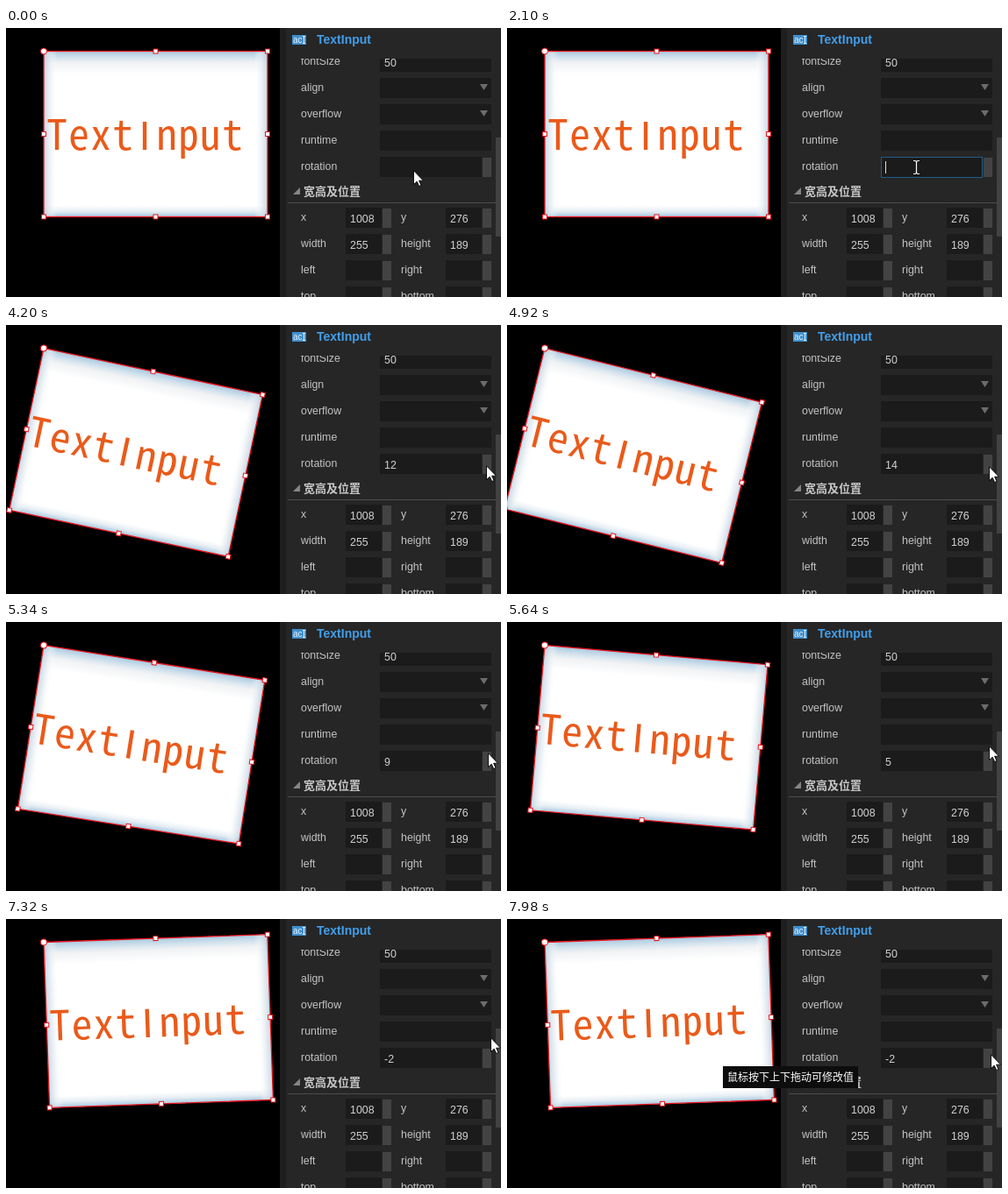
Recreate the animation shown at these times as an HTML page. Size 564 by 307 pixels, loop 8 s.

```html
<!DOCTYPE html>
<html lang="zh">
<head>
<meta charset="utf-8">
<title>Rotation field</title>
<style>
html, body { margin: 0; width: 100%; height: 100%; overflow: hidden; background: #000; }
svg { display: block; width: 564px; height: 307px; font: 12.4px "Liberation Sans", Arial, sans-serif; }
.label { fill: #c3c3c3; }
.value { fill: #d2d2d2; }
.cjk { font-family: "Noto Sans CJK SC", "Noto Sans CJK", sans-serif; }
.word { font: 47px "Noto Sans Mono CJK SC", "Noto Sans Mono", monospace; fill: #ea5a1a; text-anchor: middle; }
.bar { font-family: "Liberation Sans", sans-serif; }
.handle { fill: #fff; stroke: #e8141c; }
</style>
</head>
<body>
<svg viewBox="0 0 564 307">
  <defs>
    <clipPath id="canvasClip"><rect width="312" height="307"/></clipPath>
    <clipPath id="bodyClip"><rect x="312" y="35" width="252" height="272"/></clipPath>
    <linearGradient id="topShade" x2="0" y2="1">
      <stop offset="0" stop-color="#a9c9e0"/>
      <stop offset=".3" stop-color="#d6e4ee"/>
      <stop offset=".5" stop-color="#f0f2f4"/>
      <stop offset="1" stop-color="#fff"/>
    </linearGradient>
    <linearGradient id="bottomShade" x2="0" y2="1">
      <stop offset="0" stop-color="#fff"/>
      <stop offset=".5" stop-color="#e6eef4"/>
      <stop offset="1" stop-color="#a9c9e0"/>
    </linearGradient>
    <linearGradient id="sideShade">
      <stop offset="0" stop-color="#b9d0e0" stop-opacity=".8"/>
      <stop offset=".03" stop-color="#e4ebf0" stop-opacity=".6"/>
      <stop offset=".06" stop-color="#fff" stop-opacity="0"/>
      <stop offset=".94" stop-color="#fff" stop-opacity="0"/>
      <stop offset=".97" stop-color="#e4ebf0" stop-opacity=".6"/>
      <stop offset="1" stop-color="#b9d0e0" stop-opacity=".8"/>
    </linearGradient>
  </defs>

  <rect width="564" height="307"/>
  <g clip-path="url(#canvasClip)">
    <g id="box">
      <rect x="43" y="26.5" width="255" height="189" fill="#fff"/>
      <rect x="43" y="26.5" width="255" height="26" fill="url(#topShade)"/>
      <rect x="43" y="202.5" width="255" height="13" fill="url(#bottomShade)"/>
      <rect x="43" y="26.5" width="255" height="189" fill="url(#sideShade)"/>
      <text class="word" id="word"></text>
      <rect x="43" y="26.5" width="255" height="189" fill="none" stroke="#e8141c" stroke-width="1.3"/>
      <g id="handles"></g>
    </g>
  </g>

  <rect x="312" width="252" height="307" fill="#262626"/>
  <rect x="312" width="7" height="307" fill="#1e1e1e"/>
  <rect x="326" y="8" width="16" height="11" fill="#3f8fce"/>
  <text x="327" y="17" font-size="10" fill="#e8f1f8">ac</text>
  <path d="M339.5 9v9M338 9.5h3M338 17.5h3" stroke="#e8f1f8" fill="none"/>
  <text x="354" y="18" font-size="14" font-weight="bold" fill="#429fec">TextInput</text>

  <g id="rows" clip-path="url(#bodyClip)"></g>
  <path d="M335 182v8h-8z" fill="#858585"/>
  <text class="cjk" x="339" y="191" font-size="13" font-weight="bold" fill="#c8c8c8">宽高及位置</text>
  <path d="M321 199.5h237" stroke="#4c4c4c"/>
  <rect x="558" y="125" width="6" height="113" fill="#424242"/>

  <rect id="focus" x="426.5" y="147.5" width="115" height="23" fill="none" stroke="#1f5d8a"/>
  <text id="angle" class="value" x="431" y="164"></text>
  <rect id="caret" y="152" width="1" height="14" fill="#e0e0e0"/>

  <g id="tip">
    <rect width="154" height="25" fill="#0d0d0d"/>
    <text class="cjk" x="5" y="17" font-size="12" fill="#fff">鼠标按下上下拖动可修改值</text>
  </g>
  <path id="arrow" d="M.5 .8V16.6L4.2 13.2L6.7 18.5L9 17.5L6.6 12.2H11.5z" fill="#fff" stroke="#000" stroke-width=".9"/>
  <path id="beam" d="M-3 -7.5H-1L.5 -6.5L2 -7.5H4M.5 -7V7M-3 7.5H-1L.5 6.5L2 7.5H4" fill="none" stroke="#fff" stroke-width="1.2"/>
</svg>
<script>
const LOOP = 8000, STEP = 60;
const $ = id => document.getElementById(id);

// Static parts
$('word').innerHTML = [...'TextInput'].map((c, i) =>
  `<tspan x="${58 + 25 * i}" y="139"${c === 'I' ? ' class="bar"' : ''}>${c}</tspan>`).join('');

let handles = '';
for (const y of [26.5, 121, 215.5])
  for (const x of [43, 170.5, 298]) {
    if (x === 170.5 && y === 121) continue;
    handles += x === 43 && y === 26.5
      ? `<circle class="handle" cx="${x}" cy="${y}" r="3.5"/>`
      : `<rect class="handle" x="${x - 2.5}" y="${y - 2.5}" width="5" height="5"/>`;
  }
$('handles').innerHTML = handles;

const rect = (x, y, w, h, fill) => `<rect x="${x}" y="${y}" width="${w}" height="${h}" fill="${fill}"/>`;
const text = (x, y, cls, s) => `<text x="${x}" y="${y}" class="${cls}">${s}</text>`;
const label = (x, y, s) => text(x, y + 4, 'label', s);

function field(x, y, w, value = '', stepper = false) {
  return rect(x, y - 11, w, 23, '#1b1b1b') + text(x + 5, y + 6, 'value', value) +
    (stepper ? rect(x + w + 1, y - 10, 10, 22, '#434343') : '');
}
const dropdown = y => `<path d="M540 ${y - 4}h9l-4.5 7z" fill="#6c6c6c"/>`;
const pair = (y, a, va, b, vb) =>
  label(336, y, a) + field(387, y, 41, va, true) + label(450, y, b) + field(501, y, 41, vb, true);

$('rows').innerHTML =
  label(336, 38, 'fontSize') + field(426, 38, 127, '50') +
  label(336, 68, 'align') + field(426, 68, 127) + dropdown(68) +
  label(336, 98, 'overflow') + field(426, 98, 127) + dropdown(98) +
  label(336, 128, 'runtime') + field(426, 128, 127) +
  label(336, 158, 'rotation') + field(426, 158, 116, '', true) +
  pair(216, 'x', '1008', 'y', '276') +
  pair(246, 'width', '255', 'height', '189') +
  pair(276, 'left', '', 'right', '') +
  pair(306, 'top', '', 'bottom', '');

// Motion: [time, x, y] for the pointer, [time, degrees] for the box
const pointer = [
  [0, 464, 162], [540, 464, 162], [600, 464, 161], [840, 464, 161], [960, 464, 158],
  [1140, 464, 158], [1200, 466, 159], [2880, 466, 159], [3240, 514, 166], [3480, 544, 159],
  [3600, 544, 159], [3660, 544, 158], [3780, 546, 158], [3900, 546, 158], [4500, 548, 162],
  [4860, 548, 162], [4920, 549, 161], [5640, 549, 141], [5700, 549, 139], [6180, 552, 134],
  [6300, 552, 132], [7260, 552, 132], [7740, 552, 153], [7860, 552, 153], [7920, 552, 154],
  [7980, 551, 154]
];
const turn = [
  [0, 0], [3900, 0], [3960, 11], [4500, 14], [4920, 14], [5640, 5], [5700, 3], [6180, -1], [6300, -2]
];

function at(keys, t) {
  const i = keys.findIndex(k => k[0] > t);
  if (i < 0) return keys[keys.length - 1].slice(1);
  const a = keys[i - 1], b = keys[i], p = (t - a[0]) / (b[0] - a[0]);
  return a.slice(1).map((v, n) => Math.round(v + (b[n + 1] - v) * p));
}
const within = (t, a, b) => t >= a && t < b;
const show = (id, on) => $(id).setAttribute('visibility', on ? 'visible' : 'hidden');
const move = (id, x, y) => $(id).setAttribute('transform', `translate(${x} ${y})`);

function draw(time) {
  const t = Math.floor(time / STEP) * STEP;
  const [x, y] = at(pointer, t), [deg] = at(turn, t);
  const typed = t < 2820 ? '' : t < 3000 ? '1' : t < 3960 ? '11' : String(deg);
  const isBeam = within(t, 1200, 3660);

  $('box').setAttribute('transform', `rotate(${deg} 43 26.5)`);
  $('angle').textContent = typed;
  $('caret').setAttribute('x', 431 + 7 * typed.length);
  show('caret', within(t, 1140, 1620) || within(t, 2100, 2580) || within(t, 2820, 3480));
  show('focus', within(t, 1140, 3960));
  show('arrow', !isBeam);
  show('beam', isBeam);
  move('arrow', x, y);
  move('beam', x, y);
  show('tip', t >= 7740);
  move('tip', x - 305, y + 14);
}

const start = performance.now();
function tick() {
  draw((performance.now() - start) % LOOP);
  requestAnimationFrame(tick);
}
tick();
</script>
</body>
</html>
```
